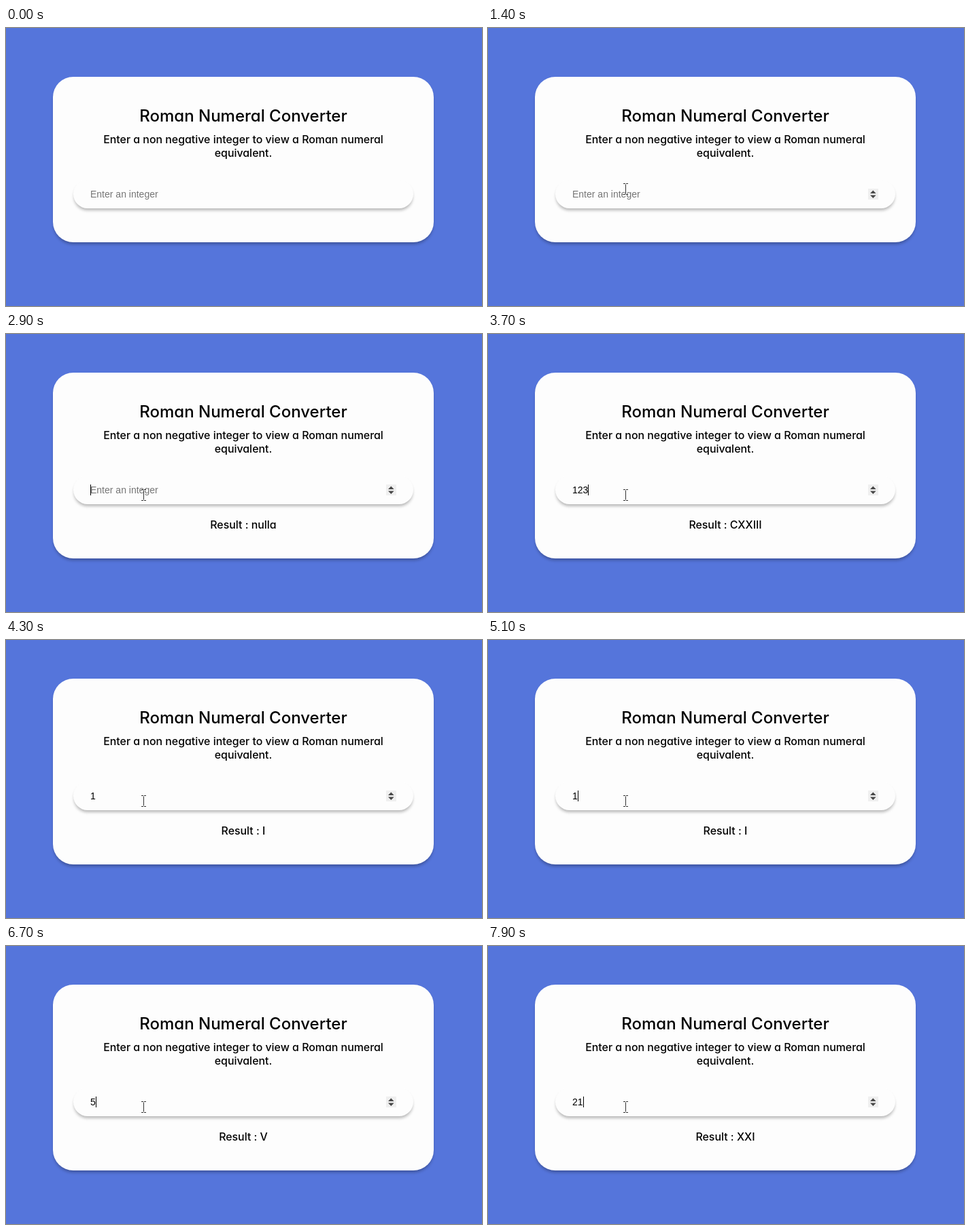
These frames come from a looping animation (700 by 410 pixels, 8 s). An HTML page:

```html
<!DOCTYPE html>
<html lang="en">
<head>
<meta charset="utf-8">
<title>Roman Numeral Converter</title>
<style>
  html, body { margin: 0; width: 100%; height: 100%; overflow: hidden; background: #5575db; }
  #stage { position: relative; width: 700px; height: 410px; overflow: hidden; }
  #card, #field { position: absolute; background: #fdfdfd; box-shadow: 0 4px 4px -1px rgba(0, 0, 0, .27); }
  #card { left: 69px; width: 560px; border-radius: 30px; }
  #field { left: 30px; top: 152px; width: 500px; height: 42px; border-radius: 21px; }
  svg { position: absolute; left: 0; top: 0; }
  .round {
    font-family: Inter, Lato, sans-serif; font-weight: 500; font-size: 15.9px;
    font-optical-sizing: none; font-feature-settings: "cv11"; text-anchor: middle;
  }
  #heading { font-size: 24px; }
  #entry { font: 14px "Liberation Sans", Arial, sans-serif; }
</style>
</head>
<body>
<div id="stage">
  <div id="card"><div id="field"></div></div>
  <svg width="700" height="410" viewBox="0 0 700 410">
    <g id="content">
      <text class="round" id="heading" x="349" y="138">Roman Numeral Converter</text>
      <text class="round" x="349" y="170">Enter a non negative integer to view a Roman numeral</text>
      <text class="round" x="349" y="190">equivalent.</text>
      <text id="entry" x="124" y="250"></text>
      <rect id="caret" y="237" width="1" height="16" shape-rendering="crispEdges"/>
      <g id="spinner">
        <rect x="559" y="237" width="15" height="16" fill="#efefef"/>
        <path d="M562 244L566.3 239.5L570.6 244ZM562 246.5L566.3 251L570.6 246.5Z" fill="#484848"/>
      </g>
      <text class="round" id="result" x="349" y="302"></text>
    </g>
    <g id="pointer" fill="none">
      <path d="M-3 -7.5H-1L0 -6.5L1 -7.5H3M0 -6.5V6.5M-3 7.5H-1L0 6.5L1 7.5H3" stroke="#fff" stroke-width="2" opacity=".6"/>
      <path d="M-3.5 -8H-.5M.5 -8H3.5M0 -7V7M-3.5 8H-.5M.5 8H3.5" stroke="#333" stroke-width="1"/>
    </g>
  </svg>
</div>
<script>
const LOOP = 8000, TICK = 100, FIRST_KEY = 1600;
const entries = [
  [0, ""], [1600, "0"], [2400, ""], [3200, "1"], [3300, "12"], [3700, "123"],
  [4100, "12"], [4300, "1"], [4500, ""], [5100, "1"], [5300, "10"], [5600, "1"],
  [6000, ""], [6700, "5"], [7000, "50"], [7300, "5"], [7600, ""], [7800, "2"], [7900, "21"]
];
// The caret flips at each of these times, starting hidden.
const flips = [800, 1400, 1600, 2200, 2900, 4300, 4900, 5900, 6500, 7500, 7800];
const numerals = [
  ["M", 1000], ["CM", 900], ["D", 500], ["CD", 400], ["C", 100], ["XC", 90], ["L", 50],
  ["XL", 40], ["X", 10], ["IX", 9], ["V", 5], ["IV", 4], ["I", 1]
];
const [card, content, entry, caret, spinner, result, pointer] =
  ["card", "content", "entry", "caret", "spinner", "result", "pointer"]
    .map(id => document.getElementById(id));

function toRoman(n) {
  let out = "";
  for (const [symbol, size] of numerals) {
    while (n >= size) { out += symbol; n -= size; }
  }
  return out || "nulla";
}

function show(node, on) {
  node.setAttribute("visibility", on ? "visible" : "hidden");
}

function draw(time) {
  const t = Math.floor(time % LOOP / TICK) * TICK;
  const value = entries.filter(e => e[0] <= t).pop()[1];
  const open = t >= FIRST_KEY;

  card.style.top = (open ? 57 : 72) + "px";
  card.style.height = (open ? 274 : 244) + "px";
  content.setAttribute("transform", `translate(0 ${open ? -15 : 0})`);

  entry.textContent = value || "Enter an integer";
  entry.setAttribute("fill", value ? "#000" : "#757575");
  result.textContent = open ? "Result : " + toRoman(+value) : "";

  caret.setAttribute("x", 124 + Math.round(value.length * 7.786));
  show(caret, flips.filter(f => f <= t).length % 2);

  // The pointer glides down to the field and settles there.
  const p = Math.min(Math.max((t - 200) / 500, 0), 1);
  const left = (1 - p) ** 2;
  const x = Math.round(202 + 100 * left) + .5;
  const y = Math.round(237 - 83 * left) + .5;
  pointer.setAttribute("transform", `translate(${x} ${y})`);
  show(pointer, t >= 200);
  show(spinner, t >= 200 && y >= 224);
}

function loop() {
  draw(performance.now());
  requestAnimationFrame(loop);
}
loop();
</script>
</body>
</html>
```
